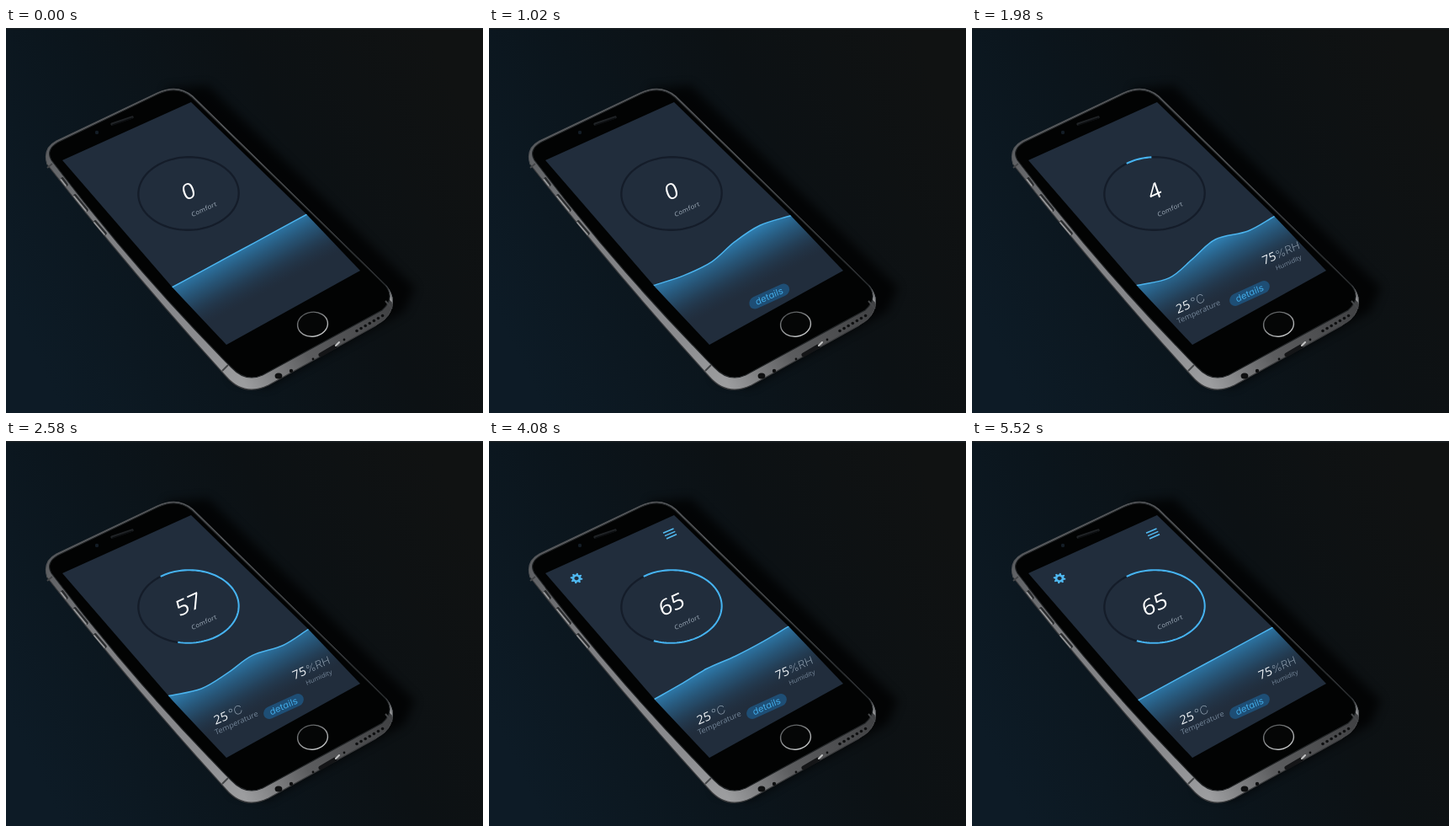
An HTML page that plays this animation: 567 px wide and 457 px high, repeating every 5580 ms.

```html
<!DOCTYPE html>
<html lang="en">
<head>
<meta charset="utf-8">
<title>Comfort monitor</title>
<style>
html, body { margin: 0; width: 100%; height: 100%; overflow: hidden; background: #0b1115; }
svg { display: block; width: 567px; height: 457px; }
text { font-family: "Open Sans", "Noto Sans", sans-serif; }
.unit { font-family: Inter, "Noto Sans", sans-serif; font-weight: 200; fill: #a3b3c2; }
.label { fill: #75879a; }
.pill { font-family: Inter, sans-serif; font-feature-settings: "cv11"; fill: #41abe8; }
</style>
</head>
<body>
<svg viewBox="0 0 567 457">
  <defs>
    <linearGradient id="room" x1="0" y1=".7" x2="1" y2=".3">
      <stop offset="0" stop-color="#0d1b26"/>
      <stop offset=".35" stop-color="#0b151c"/>
      <stop offset=".65" stop-color="#0c1114"/>
      <stop offset="1" stop-color="#101212"/>
    </linearGradient>
    <linearGradient id="metal" gradientUnits="userSpaceOnUse" x1="50" y1="140" x2="275" y2="425">
      <stop offset="0" stop-color="#5b5d60"/>
      <stop offset=".3" stop-color="#7d7e81"/>
      <stop offset=".8" stop-color="#8b8c8f"/>
      <stop offset="1" stop-color="#9c9d9f"/>
    </linearGradient>
    <linearGradient id="dim" gradientUnits="userSpaceOnUse" x1="285" y1="425" x2="462" y2="325">
      <stop offset="0" stop-color="#1b1c1e" stop-opacity="0"/>
      <stop offset=".4" stop-color="#1b1c1e" stop-opacity=".5"/>
      <stop offset="1" stop-color="#1b1c1e" stop-opacity=".72"/>
    </linearGradient>
    <linearGradient id="water" gradientUnits="userSpaceOnUse" x1="274" y1="259" x2="305" y2="316">
      <stop offset="0" stop-color="#3080b3"/>
      <stop offset=".15" stop-color="#2b6d99"/>
      <stop offset=".5" stop-color="#265070" stop-opacity=".8"/>
      <stop offset="1" stop-color="#223448" stop-opacity="0"/>
    </linearGradient>
    <linearGradient id="steel" x1="0" y1="0" x2=".5" y2="1">
      <stop offset="0" stop-color="#484b4d"/>
      <stop offset="1" stop-color="#c0c2c3"/>
    </linearGradient>
    <filter id="blur" x="-30%" y="-30%" width="160%" height="160%"><feGaussianBlur stdDeviation="6"/></filter>
    <clipPath id="screen"><path d="M67,157 L220,88 L357,221 L421,288 L262,376 L198,308 Z"/></clipPath>
  </defs>

  <rect width="567" height="457" fill="url(#room)"/>
  <rect width="567" height="1.5" fill="#1b2024"/>
  <path d="M190,72 L240,68 L486,308 L474,336 L310,426 L270,418 Z" fill="#020304" opacity=".75" filter="url(#blur)"/>

  <g id="phone">
    <path d="M49,162 Q43,143 60,134 L180,77 Q204,66 222,81 L452,306 Q465,321 457,337 Q453,346 440,353 L312,424 Q283,438 262,414 Q150,291 49,162 Z" fill="url(#metal)"/>
    <path d="M264,411 L452,318 L460,327 Q457,345 440,353 L312,424 Q290,434 274,424 Z" fill="url(#dim)"/>
    <path d="M49,162 Q43,143 60,134 L180,77 Q204,66 222,81 L452,306 Q461,317 459,328" fill="none" stroke="#505356" stroke-width="1.1"/>
    <path d="M49,162 Q150,291 262,414 Q283,438 312,424 L440,353" fill="none" stroke="#3a3b3d" stroke-width="1.2"/>
    <path d="M54,157 Q46.5,144.5 62,135.5 L181,78.3 Q204,67.7 221,82.2 L451,305.5 Q463,321 447,335 L305,412 Q285,421 268,403 Q152,286 54,157 Z" fill="#020303" stroke="#222527" stroke-width="1.2"/>
    <g fill="none" stroke-linecap="round">
      <path d="M67,179 L72,186 M82,199 L96,216 M106,230 L118,244" stroke="#2b2d2f" stroke-width="3.6"/>
      <path d="M65.5,180 L71,187 M81,200 L95,217 M105,231 L117,245" stroke="#999b9d" stroke-width="1.7"/>
      <path d="M49,166 L55,161 M257,407 L264,400 M451,324 L459,333" stroke="#454749" stroke-width="2" stroke-linecap="butt"/>
      <path d="M374,388 L391,378" stroke="#141517" stroke-width="5"/>
      <path d="M392,377 L396,373" stroke="#c3c4c5" stroke-width="2"/>
      <path d="M126,114 L150,106" stroke="#202326" stroke-width="3.4"/>
      <path d="M127,115 L150,107" stroke="#0c0e10" stroke-width="1.5"/>
    </g>
    <g id="holes" fill="#0e0f10">
      <ellipse cx="324" cy="413" rx="4.4" ry="3.5"/>
      <circle cx="339" cy="407" r="2.2"/>
      <circle cx="365" cy="393" r="1.4"/>
      <circle cx="402" cy="370" r="1.4"/>
    </g>
    <circle cx="108" cy="124" r="2.2" fill="#141d26"/>
    <ellipse cx="364.5" cy="351.7" rx="18" ry="14.5" fill="#050606" stroke="url(#steel)" stroke-width="1.4" transform="rotate(-8 364.5 351.7)"/>
  </g>

  <g clip-path="url(#screen)">
    <rect x="60" y="80" width="370" height="310" fill="#212d3c"/>
    <path id="fill" fill="url(#water)"/>
    <path id="crest" fill="none" stroke="#4bb4ee" stroke-width="1.5"/>
    <path id="track" fill="none" stroke="#141c29" stroke-width="2.3"/>
    <path id="arc" fill="none" stroke="#47b3f0" stroke-width="2.1"/>
    <text id="count" font-size="27" text-anchor="middle" fill="#fff"></text>
    <text id="comfort" font-size="7.8" letter-spacing=".3" text-anchor="middle" fill="#a3b0be">Comfort</text>

    <g id="pill">
      <g id="button">
        <rect x="-25.5" y="-7.6" width="51" height="15.2" rx="7.6" fill="#1e4e75"/>
        <text class="pill" y="3.7" font-size="11.2" text-anchor="middle">details</text>
      </g>
    </g>
    <g id="temp">
      <text id="degrees" font-size="15" fill="#f2f6f9">25<tspan class="unit" dx="2" font-size="14.5">°C</tspan></text>
      <text id="tempLabel" class="label" font-size="9.2">Temperature</text>
    </g>
    <g id="humid">
      <text id="percent" font-size="14.6" fill="#f2f6f9">75<tspan class="unit" dx=".5" font-size="13.4">%RH</tspan></text>
      <text id="humidLabel" class="label" font-size="7.8">Humidity</text>
    </g>
    <path id="gear" fill="#4fb8f0" fill-rule="evenodd"/>
    <path id="menu" d="M207,109.2 L219.5,104 M209,112.6 L221.3,107.4 M211,116 L223,110.8" stroke="#52baf1" stroke-width="1.5"/>
  </g>
</svg>

<script>
const LOOP = 5580, STEP = 60;
const $ = id => document.getElementById(id);
const clamp = x => Math.max(0, Math.min(1, x));
const span = (t, a, b) => clamp((t - a) / (b - a));
const smooth = p => p * p * (3 - 2 * p);
const remain = (t, a, b) => (1 - span(t, a, b)) ** 2;
const fix = p => p.map(n => n.toFixed(2)).join();

// Lay text on the tilted screen plane.
function tilt(id, x, y) {
  $(id).setAttribute("transform", `matrix(.92 -.42 .32 .9 ${x} ${y})`);
}
tilt("count", 220, 202.3);
tilt("comfort", 236.2, 217.4);
tilt("button", 330, 315);
tilt("degrees", 249, 337);
tilt("tempLabel", 249.5, 349);
tilt("percent", 342.5, 283.5);
tilt("humidLabel", 357.5, 290);

// Clockwise ring point; a = 0 is the top of the dial in screen space.
const ring = a => {
  const x = Math.sin(a) * 119, y = -Math.cos(a) * 119;
  return [217 + .416 * x + .28 * y, 196.5 - .207 * x + .299 * y];
};
function ringPath(part) {
  const n = Math.max(2, Math.ceil(part * 120));
  const pts = Array.from({ length: n + 1 }, (_, i) => fix(ring(i / n * part * 2 * Math.PI)));
  return "M" + pts.join("L");
}
$("track").setAttribute("d", ringPath(1));

// Gear with eight teeth and a round hub.
function gearPath(cx, cy) {
  const at = (r, a) => fix([cx + r * 1.08 * Math.cos(a), cy + r * .92 * Math.sin(a)]);
  const teeth = [], hub = [];
  for (let i = 0; i < 32; i++) {
    teeth.push(at(i % 4 < 2 ? 6.8 : 4.9, (i + .2) * Math.PI / 16));
    hub.push(at(2.4, i * Math.PI / 16));
  }
  return `M${teeth.join("L")}ZM${hub.join("L")}Z`;
}
$("gear").setAttribute("d", gearPath(104, 163));

for (let i = 0; i < 7; i++) {
  const hole = document.createElementNS("http://www.w3.org/2000/svg", "circle");
  hole.setAttribute("cx", 417 + i * 5.1);
  hole.setAttribute("cy", 359.5 - i * 3);
  hole.setAttribute("r", 1.8);
  $("holes").append(hole);
}

// Time, then the water height at six evenly spaced points.
const WAVE = [
  [0, 0, 0, 0, 0, 0, 0],
  [1020, -3, 4, 5.5, -2.5, -5.5, 2],
  [1980, -3, 8, 1.2, -6.5, 3.5, 3],
  [2580, -7, 4.5, 3, -1.5, 5.5, 3],
  [3420, -1, -1.5, -1.8, .5, -1, -1],
  [4740, -2, -3, -6, -2, .5, -2.5],
  [5520, 0, 0, 0, 0, 0, 0],
];
function heights(t) {
  let k = 0;
  while (k < WAVE.length - 2 && t >= WAVE[k + 1][0]) k++;
  const [t0, ...a] = WAVE[k], [t1, ...b] = WAVE[k + 1];
  const p = smooth(span(t, t0, t1));
  return a.map((h, i) => h + (b[i] - h) * p);
}
function crestPath(h) {
  const pt = (u, d) => [197 + 161 * u + .667 * d, 308 - 87 * u + .745 * d];
  const p = i => pt(i / 5, i < 0 ? 2 * h[0] - h[1] : i > 5 ? 2 * h[5] - h[4] : h[i]);
  const blend = (a, b, c) => fix(a.map((v, j) => v + (c[j] - b[j]) / 6));
  let d = `M${fix(pt(-.06, h[0]))}L${fix(p(0))}`;
  for (let i = 0; i < 5; i++) {
    d += `C${blend(p(i), p(i - 1), p(i + 1))} ${blend(p(i + 1), p(i + 2), p(i))} ${fix(p(i + 1))}`;
  }
  return d + `L${fix(pt(1.06, h[5]))}`;
}

const shift = (id, x, y) => $(id).setAttribute("transform", `translate(${x.toFixed(2)} ${y.toFixed(2)})`);

function draw(t) {
  const crest = crestPath(heights(t));
  $("crest").setAttribute("d", crest);
  $("fill").setAttribute("d", crest + "L440,300L263,395Z");

  const part = .652 * smooth(span(t, 1775, 2684));
  $("arc").setAttribute("d", part ? ringPath(part) : "");
  $("count").textContent = Math.round(65 * smooth(span(t, 1837, 2795)));

  const rise = remain(t, 660, 1190);
  shift("pill", 31 * rise, 34 * rise);
  const side = remain(t, 1320, 2280);
  shift("temp", -46 * side, 22 * side);
  shift("humid", 46 * side, -22 * side);
  for (const id of ["temp", "humid"]) $(id).setAttribute("opacity", span(t, 1260, 1620));
  const icons = remain(t, 2700, 3300);
  shift("gear", -30 * icons, 14 * icons);
  shift("menu", 30 * icons, -14 * icons);
  for (const id of ["gear", "menu"]) $(id).setAttribute("opacity", span(t, 2700, 3000));
}

const start = performance.now();
function tick() {
  const t = (performance.now() - start) % LOOP;
  draw(Math.floor(t / STEP) * STEP);
  requestAnimationFrame(tick);
}
tick();
</script>
</body>
</html>
```
